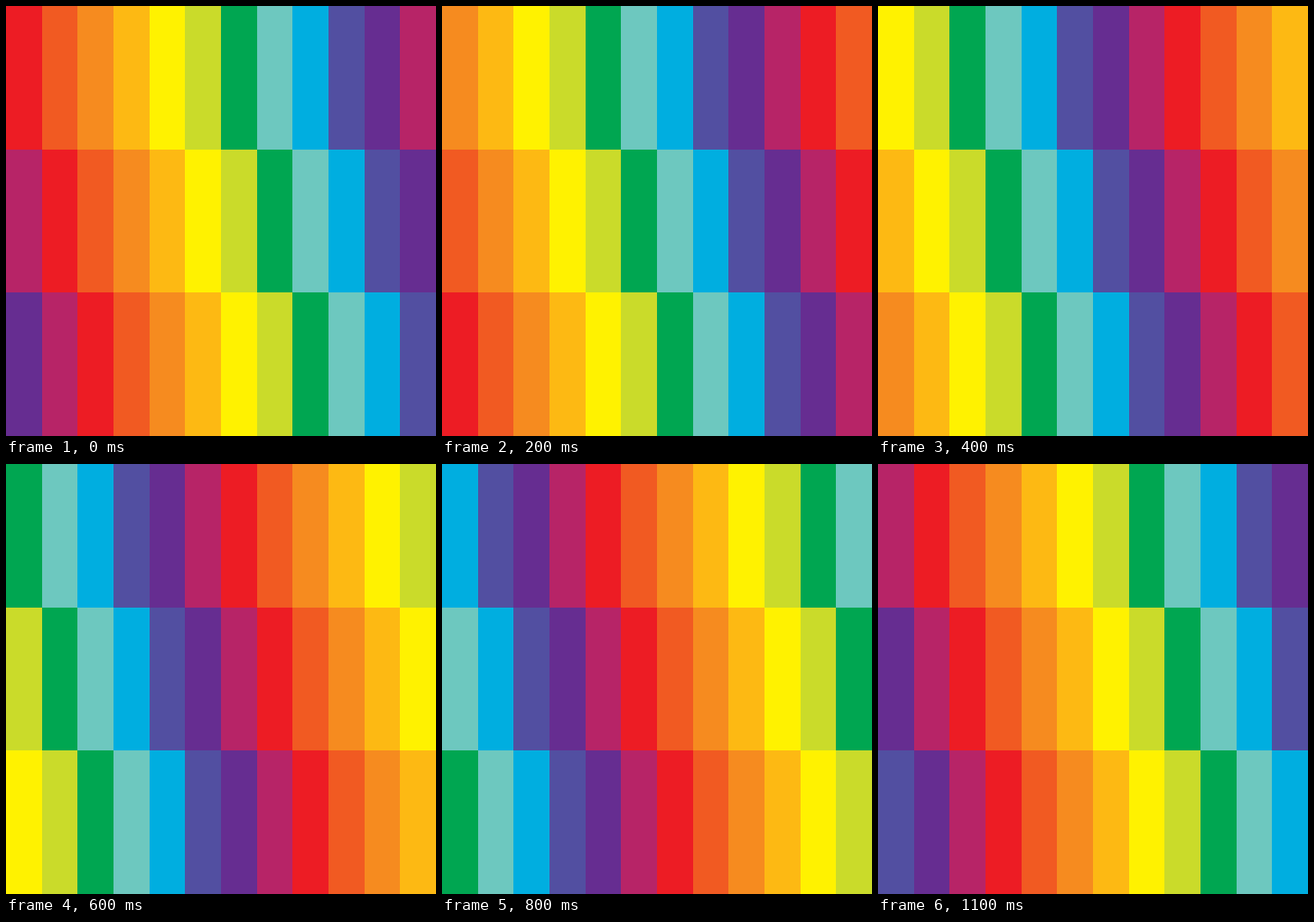
Animation of 500 by 500 pixels, one loop 1200 ms. Source, as an HTML page:

```html
<!DOCTYPE html>
<html lang="en">
<head>
<meta charset="utf-8">
<title>Rainbow steps</title>
<style>
  html, body { margin: 0; width: 100%; height: 100%; overflow: hidden; }
  #grid {
    width: 100%;
    height: 100%;
    display: grid;
    grid-template: repeat(3, 1fr) / repeat(12, 1fr);
  }
  #grid div { animation: hues 1200ms step-end infinite; }

  /* Stops are rounded down so each change falls on its 100 ms mark. */
  @keyframes hues {
    0%       { background: #ed1c24; }
    8.3333%  { background: #f15a22; }
    16.6666% { background: #f68b1f; }
    24.9999% { background: #fdb913; }
    33.3333% { background: #fff200; }
    41.6666% { background: #cadb2a; }
    49.9999% { background: #00a651; }
    58.3333% { background: #6dc8bf; }
    66.6666% { background: #00aee0; }
    74.9999% { background: #524fa1; }
    83.3333% { background: #662d91; }
    91.6666% { background: #b72467; }
    100%     { background: #ed1c24; }
  }
</style>
</head>
<body>
<div id="grid"></div>
<script>
  const COLS = 12, ROWS = 3, STEP = 100;
  const grid = document.getElementById('grid');

  // Each column runs one hue ahead of its left neighbour; each row lags one behind.
  for (let row = 0; row < ROWS; row++) {
    for (let col = 0; col < COLS; col++) {
      const cell = document.createElement('div');
      const lead = (col - row + COLS) % COLS;
      cell.style.animationDelay = `${-lead * STEP}ms`;
      grid.append(cell);
    }
  }
</script>
</body>
</html>
```
